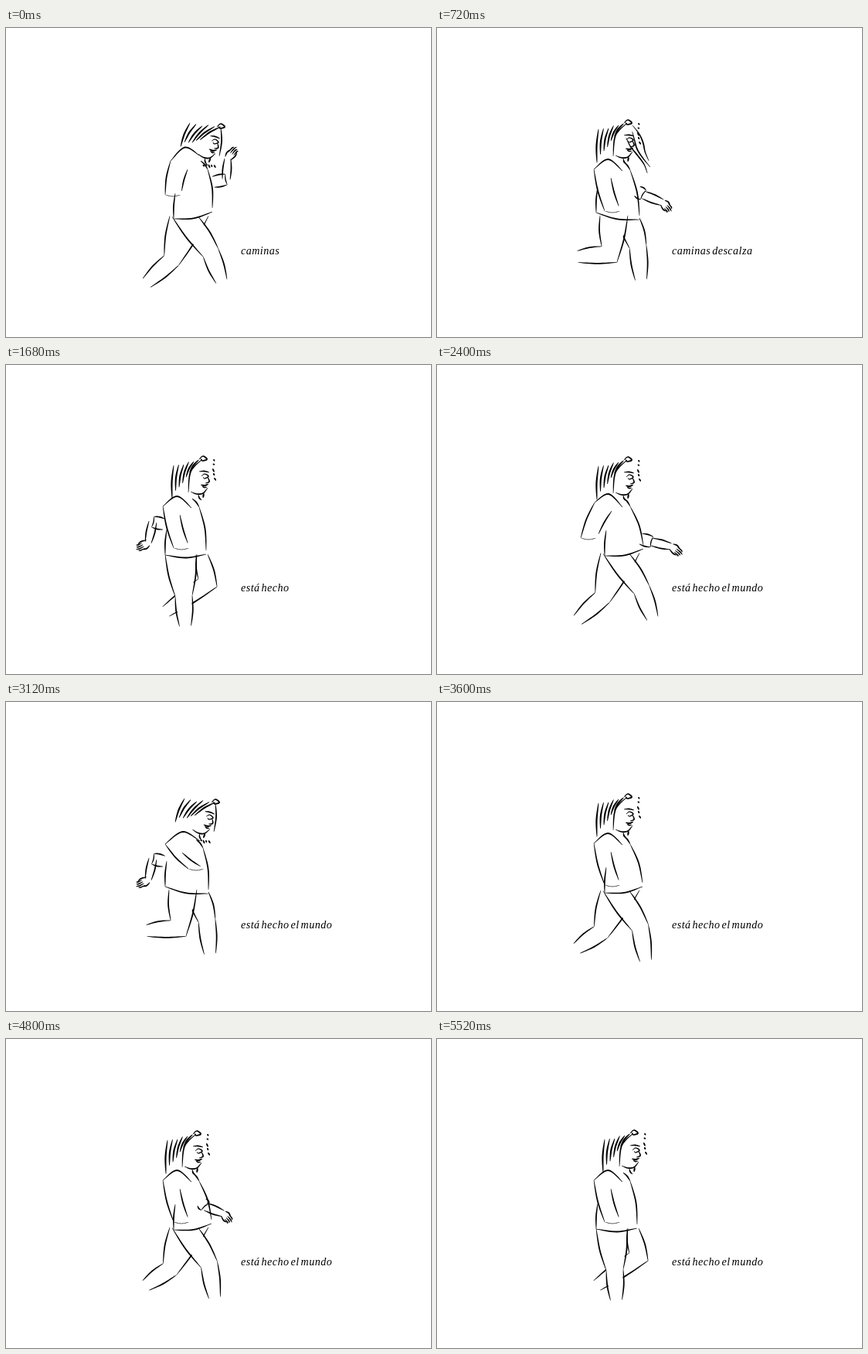
These frames come from a looping animation (550x400 px, 5.76 s). An HTML page with a canvas:

```html
<!DOCTYPE html>
<html lang="es">
<head>
<meta charset="utf-8">
<title>Caminas descalza</title>
<style>
html, body { margin: 0; width: 100%; height: 100%; overflow: hidden; background: #fff; }
canvas { display: block; }
</style>
</head>
<body>
<canvas id="stage" width="550" height="400"></canvas>
<script>
const LOOP = 5760, POSE = 240, TICK = 40;
const ctx = document.getElementById('stage').getContext('2d');

let seed = 1;
function jitter(range) {
  seed = seed * 16807 % 2147483647;
  return (seed / 2147483647 * 2 - 1) * range;
}

const add = (p, x, y) => [p[0] + x, p[1] + y];
const mix = (a, b, u) => a.map((v, i) => v + (b[i] - v) * u);
// Unit vector to the right of a downward line from a to b.
function normal(a, b) {
  const x = b[0] - a[0], y = b[1] - a[1], len = Math.hypot(x, y) || 1;
  return [y / len, -x / len];
}

function spline(p) {
  const out = [], at = i => p[Math.max(0, Math.min(p.length - 1, i))];
  for (let i = 0; i < p.length - 1; i++) {
    for (let j = 0; j < 8; j++) {
      const u = j / 8;
      out.push([0, 1].map(k => {
        const a = at(i - 1)[k], b = at(i)[k], c = at(i + 1)[k], d = at(i + 2)[k];
        return b + u * (c - a + u * (2 * a - 5 * b + 4 * c - d + u * (3 * (b - c) + d - a))) / 2;
      }));
    }
  }
  out.push(at(p.length - 1));
  return out;
}

// A stroke swells in the middle and thins at both ends.
function brush(points, size = 1.8) {
  const c = spline(points), last = c.length - 1, left = [], right = [];
  c.forEach((p, i) => {
    const n = normal(c[Math.max(0, i - 1)], c[Math.min(last, i + 1)]);
    const r = size * (0.28 + 0.72 * Math.sin(Math.PI * i / last)) / 2;
    left.push(add(p, -n[0] * r, -n[1] * r));
    right.unshift(add(p, n[0] * r, n[1] * r));
  });
  ctx.beginPath();
  left.concat(right).forEach(q => ctx.lineTo(q[0], q[1]));
  ctx.fill();
}

function arc(a, b, bow = 0, size) {
  const n = normal(a, b);
  brush([a, add(mix(a, b, 0.5), n[0] * bow, n[1] * bow), b], size);
}

function place([x, y], angle, paint) {
  ctx.save();
  ctx.translate(x, y);
  ctx.rotate(angle);
  paint();
  ctx.restore();
}

// Heads: eye position, tilt, and the first lock with the step to the next one
const heads = {
  raised: { eye: [249, 145], tilt: 0, tuft: [247, 122], root: [209, 133], rootStep: [6.5, -2],
    tip: [207, 172], tipStep: [4.5, -6.5], curtain: [[246, 123], [231, 139], [228, 166]] },
  bowed: { eye: [270, 147], tilt: 0.2, tuft: [278, 127], root: [238, 125], rootStep: [8, 0.4],
    tip: [226, 151], tipStep: [5, -1.4], curtain: [[278, 129], [279, 147], [276, 166]] }
};

function face() {
  arc([-7, -6], [6, -5], 1);
  brush([[-4, 0], [0, -3], [5, 0], [0, 3], [-2, 1]], 1.5);
  brush([[4, 1], [6, 7], [1, 9]]);
  arc([-5, 11], [5, 10], -1.5, 2.2);
  arc([-3, 13], [3, 14], -1);
  brush([[4, 15], [-2, 22], [-10, 23], [-18, 20]]);
  arc([-8, 24], [-4, 31], -1);
  arc([-1, 22], [-2, 28], 0, 2.2);
}

function head(kind, x, y) {
  const h = heads[kind];
  place([x, y], 0, () => {
    for (let i = 0; i < 6; i++) {
      const root = add(h.root, h.rootStep[0] * i, h.rootStep[1] * i + jitter(2));
      const tip = add(h.tip, h.tipStep[0] * i, h.tipStep[1] * i + jitter(3));
      arc(root, tip, -1.5, 2.2);
    }
    brush(h.curtain);
    place(h.tuft, 0, () => brush([[-5, 1], [0, -3], [5, 1], [-1, 3], [-3, 0]], 2));
    place(h.eye, h.tilt, face);
    for (let i = 0; i < 5; i++) {
      const p = kind === 'raised' ? [258 + jitter(4), 123 + i * 6] : [255 + i * 3.5, 176 + jitter(1.5)];
      arc(p, add(p, 2 + jitter(1), 3 + jitter(2)), 0, 2);
    }
  });
}

function flyingHair() {
  for (let i = 0; i < 3; i++) {
    const wave = [];
    for (let u = 0; u <= 1; u += 0.25) {
      wave.push([253 - 3 * i + 24 * u + 3 * Math.sin(5 * u + 2 * i), 126 + 8 * i + 46 * u]);
    }
    brush(wave);
  }
}

const torsos = {
  stoop: { neck: [250, 165], shoulder: [213, 172], cuff: [206, 216], throat: [261, 183] },
  hunch: { neck: [251, 180], shoulder: [206, 184], cuff: [236, 216], throat: [255, 189] },
  upright: { neck: [240, 185], shoulder: [203, 183], cuff: [217, 237], throat: [250, 184] },
  stride: { neck: [240, 184], shoulder: [204, 178], cuff: [186, 224], throat: [250, 183] }
};

function torso({ neck, shoulder, cuff, throat }, [left, right]) {
  brush([neck, add(mix(neck, shoulder, 0.5), 0, -14), shoulder]);
  arc(shoulder, cuff, -2);
  const fold = add(shoulder, 22, 11), end = add(cuff, 20, 0);
  arc(fold, mix(fold, end, 0.85), -1);
  arc(cuff, end, -2, 0.7);
  arc(add(throat, -9, -11), throat, 1);
  arc(throat, add(right, 0, -5), 3);
  arc(add(left, 2, -33), left, -1);
  arc(left, right, -4);
}

const arms = {
  fist: { socket: [264, 200], elbow: [285, 196], wrist: [287, 169], turn: -0.95, reach: 19 },
  wave: { socket: [264, 200], elbow: [287, 192], wrist: [290, 165], turn: -0.95, reach: 19 },
  low: { socket: [257, 210], elbow: [267, 216], wrist: [292, 226], turn: 0.75, reach: 16 },
  mid: { socket: [252, 210], elbow: [258, 217], wrist: [281, 226], turn: 0.75, reach: 16 },
  forward: { socket: [260, 224], elbow: [278, 229], wrist: [303, 235], turn: 0.6, reach: 18 },
  back: { socket: [208, 207], elbow: [190, 203], wrist: [184, 230], turn: 2.6, reach: 18 },
  farBack: { socket: [208, 196], elbow: [188, 190], wrist: [171, 212], turn: 2.75, reach: 18 }
};

function hand(size) {
  arc([0, -4], [size * 0.6, -4], 1.5);
  for (let i = 0; i < 4; i++) {
    const y = 2.6 * i - 4;
    brush([[size * 0.4, y], [size * 0.75, y + 0.5], [size - 2 * Math.abs(i - 1), y + 2]], 1.6);
  }
  brush([[0, 4], [size * 0.4, 6], [size * 0.7, 5]]);
}

function arm({ socket, elbow, wrist, turn, reach }) {
  const across = normal(elbow, wrist), upper = normal(socket, elbow);
  const side = (p, n, r) => add(p, n[0] * r, n[1] * r);
  for (const s of [-1, 1]) {
    arc(side(elbow, across, 5 * s), side(wrist, across, 4 * s), s);
    arc(side(mix(socket, elbow, 0.2), upper, 7 * s), side(elbow, upper, 7 * s), s);
  }
  arc(side(elbow, upper, -7), side(elbow, upper, 7), 1, 1.4);
  place(wrist, turn, () => hand(reach));
}

// Legs: hip x, hip half-width, knee x y, ankle x y
const steps = {
  apart: { hem: [[217, 247], [267, 238]], near: [232, 17, 265, 291, 279, 328], far: [237, 25, 214, 301, 182, 330] },
  plant: { hem: [[217, 247], [266, 239]], near: [232, 17, 263, 292, 270, 335], far: [237, 25, 212, 298, 181, 319] },
  passing: { hem: [[206, 246], [259, 245]], near: [226, 20, 230, 299, 232, 338], far: [254, 7, 261, 282, 207, 319] },
  kick: { hem: [[206, 239], [262, 248]], near: [229, 18, 223, 293, 182, 296], far: [248, 14, 260, 283, 264, 326] },
  swing: { hem: [[206, 239], [262, 248]], near: [229, 18, 224, 290, 196, 317], far: [248, 14, 263, 286, 260, 326] }
};

function leg([hipX, hipW, kx, ky, ax, ay], [left, right]) {
  const hip = mix(left, right, (hipX - left[0]) / (right[0] - left[0]));
  const knee = [kx, ky], ankle = [ax, ay];
  const thigh = normal(hip, knee), shin = normal(knee, ankle);
  const miter = 11 / (1 + thigh[0] * shin[0] + thigh[1] * shin[1]);
  const edge = s => [
    add(hip, s * hipW, 0),
    add(knee, s * miter * (thigh[0] + shin[0]), s * miter * (thigh[1] + shin[1])),
    add(ankle, s * 7.5 * shin[0], s * 7.5 * shin[1])
  ];
  const back = edge(-1), front = edge(1);
  // The nearer leg covers the one behind it.
  ctx.fillStyle = '#fff';
  ctx.beginPath();
  [...back, ...front.reverse()].forEach(p => ctx.lineTo(p[0], p[1]));
  ctx.fill();
  ctx.fillStyle = '#000';
  front.reverse();
  for (const [e, s] of [[back, -1], [front, 1]]) {
    arc(e[0], e[1], 2 * s);
    arc(e[1], e[2], 1.5 * s);
  }
}

// Each pose: head, its shift, torso, legs, arm
const poses = {
  start: ['bowed', 0, 0, 'stoop', 'apart', 'fist'],
  lift: ['bowed', 0, 0, 'stoop', 'plant', 'wave'],
  toss: ['raised', 5, -3, 'upright', 'passing', 'forward'],
  hair: ['raised', 0, 0, 'upright', 'kick', 'low'],
  lean: ['bowed', -4, -2, 'stoop', 'swing'],
  step: ['raised', 0, 0, 'stride', 'apart'],
  land: ['raised', 0, 0, 'upright', 'plant'],
  pass: ['raised', 8, -1, 'upright', 'passing', 'back'],
  still: ['raised', 8, -1, 'upright', 'passing'],
  run: ['bowed', -7, 2, 'hunch', 'kick', 'back'],
  push: ['bowed', -7, 2, 'hunch', 'kick', 'farBack'],
  walk: ['raised', 0, 0, 'stride', 'apart', 'forward'],
  drop: ['raised', 0, 0, 'upright', 'plant', 'mid']
};
const order = ('start lift toss hair lean step land pass push lean walk drop still run ' +
  'step land pass push lean walk drop still run still').split(' ');

function figure(name) {
  const [kind, x, y, body, stance, limb] = poses[name];
  const { hem, near, far } = steps[stance];
  seed = 7;
  leg(far, hem);
  leg(near, hem);
  torso(torsos[body], hem);
  if (limb) arm(arms[limb]);
  head(kind, x, y);
  if (name === 'hair' || name === 'toss') flyingHair();
}

function write(text, before = '', alpha = 1) {
  const x = 304 + ctx.measureText(before).width;
  ctx.globalAlpha = alpha;
  ctx.fillText(text, x, 293);
  ctx.globalAlpha = 1;
}

function caption(t) {
  ctx.font = 'italic 14px "Liberation Serif", "Noto Serif", serif';
  ctx.letterSpacing = '0.5px';
  ctx.wordSpacing = '-2px';
  if (t < 920) {
    write('caminas');
    write('descalza', 'caminas ', Math.min(1, Math.floor(t / TICK) * TICK / 480));
  } else if (t < 1160) write('sobre el polvo');
  else if (t < 1680) write('sobre el polvo del que');
  else if (t < 1920) write('está hecho');
  else write('está hecho el mundo');
}

const begin = performance.now();
function frame(now) {
  const t = Math.max(0, now - begin) % LOOP;
  ctx.fillStyle = '#fff';
  ctx.fillRect(0, 0, 550, 400);
  ctx.fillStyle = '#000';
  figure(order[Math.floor(t / POSE)]);
  caption(t);
  requestAnimationFrame(frame);
}
frame(begin);
</script>
</body>
</html>
```
